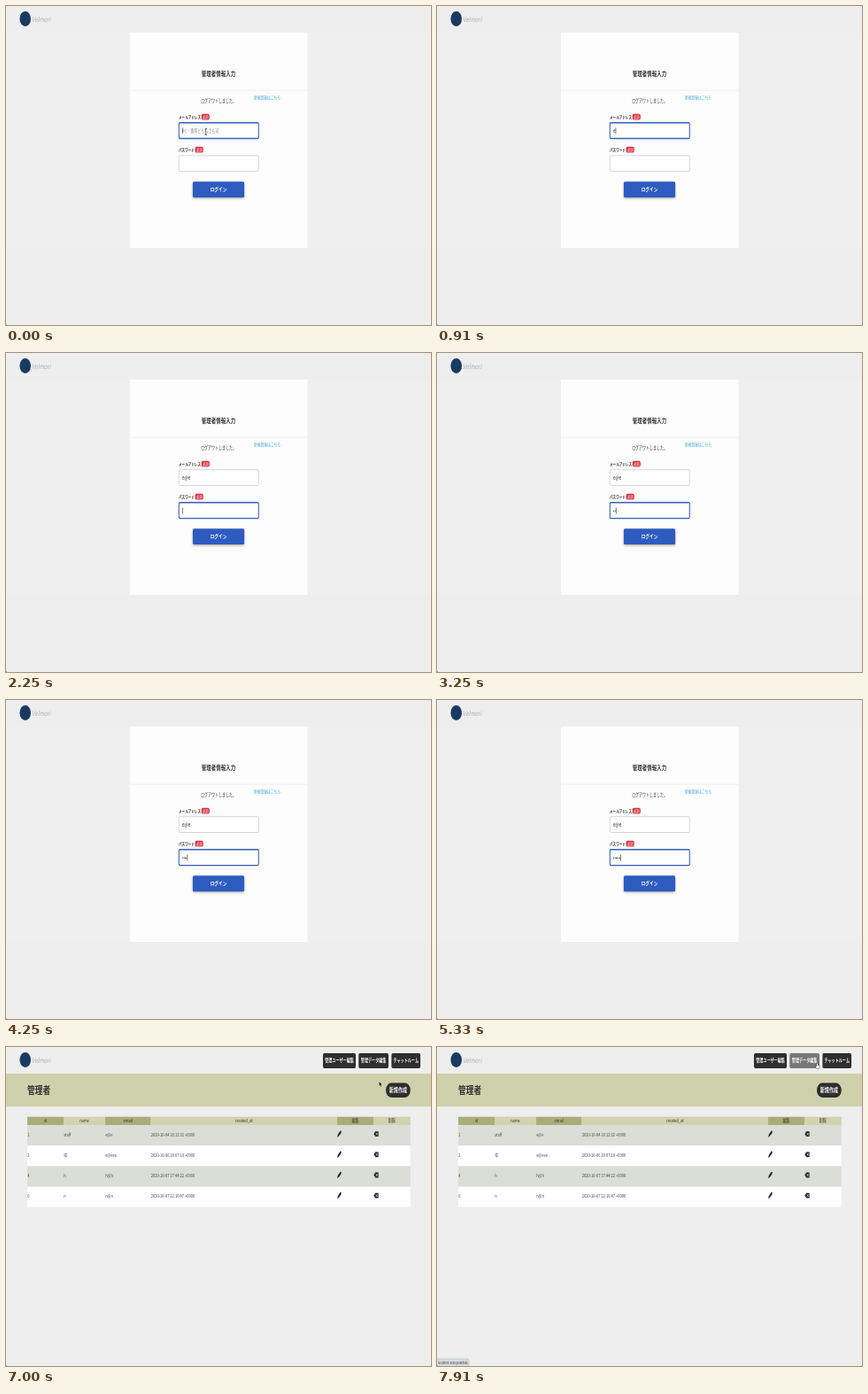
Animation, 480 px wide and 360 px high, one loop 8 s. Source, as an HTML page with a canvas:

```html
<!DOCTYPE html>
<html lang="ja">
<head>
<meta charset="utf-8">
<title>管理者情報入力</title>
<style>
  html, body { margin: 0; height: 100%; overflow: hidden; background: #eee; }
  canvas { display: block; width: 100vw; height: 100vh; }
</style>
</head>
<body>
<canvas></canvas>
<script>
const LOOP = 8000, STEP = 1000 / 12;
const DARK = '#2e2e2e', BLUE = '#2d5bc0';
const canvas = document.querySelector('canvas');
const ctx = canvas.getContext('2d');

// The screen is 640 x 360 and is squeezed to the 4:3 stage.
function fitStage() {
  const ratio = window.devicePixelRatio || 1;
  canvas.width = innerWidth * ratio;
  canvas.height = innerHeight * ratio;
}

function box(x, y, w, h, fill, radius = 0, stroke, lineWidth = 0.7) {
  ctx.beginPath();
  ctx.roundRect(x, y, w, h, radius);
  ctx.fillStyle = fill;
  ctx.fill();
  if (!stroke) return;
  ctx.strokeStyle = stroke;
  ctx.lineWidth = lineWidth;
  ctx.stroke();
}

function shadowBox(x, y, w, h, fill, radius) {
  ctx.save();
  ctx.shadowColor = 'rgba(0,0,0,.4)';
  ctx.shadowBlur = 3;
  ctx.shadowOffsetY = 1.2;
  box(x, y, w, h, fill, radius);
  ctx.restore();
}

function label(text, x, y, size, { color = '#333', weight = 400, align = 'left', style = 'normal' } = {}) {
  ctx.font = `${style} ${weight} ${size}px "Noto Sans CJK JP", "Noto Sans", sans-serif`;
  ctx.fillStyle = color;
  ctx.textAlign = align;
  ctx.fillText(text, x, y);
  return ctx.measureText(text).width;
}

function shape(x, y, points, fill, stroke) {
  ctx.beginPath();
  points.forEach(([px, py]) => ctx.lineTo(x + px, y + py));
  ctx.closePath();
  if (stroke) {
    ctx.strokeStyle = stroke;
    ctx.lineWidth = 0.9;
    ctx.stroke();
  }
  ctx.fillStyle = fill;
  ctx.fill();
}

function brand() {
  ctx.beginPath();
  ctx.arc(29, 14.5, 8.4, 0, 7);
  ctx.fillStyle = '#1b3a63';
  ctx.fill();
  label('Velmori', 39, 18, 7.8, { color: '#aab0bb', style: 'italic' });
}

function requiredBadge(x, y) {
  box(x, y, 12.2, 6.8, '#d9303f', 2.2);
  label('必須', x + 6.1, y + 5, 4.4, { color: '#fff', align: 'center', weight: 500 });
}

function field(y, { text, size, focused, placeholder, caret }) {
  box(260.4, y, 120, 17.8, '#fefefe', 1.5, focused ? '#3560b5' : '#c8c8c8', focused ? 1.4 : 0.8);
  const baseline = y + 11.4;
  const width = label(text, 265.4, baseline, size, { color: '#222', weight: 500 });
  if (placeholder && !text) label(placeholder, 265.4, y + 10.9, 5.4, { color: '#8a8a8a' });
  if (focused && caret) box(265.6 + width, y + 5.6, 0.8, 7, '#222');
}

function statusBar(width, text) {
  box(-2, 352, width + 2, 10, '#d9dddf', [0, 2, 0, 0], '#b4b8ba');
  label(text, 1.3, 357.6, 3.95, { color: '#333', weight: 500 });
}

const typedCount = (t, times) => times.filter(at => t >= at).length;

function loginPage(t) {
  box(0, 30, 640, 243, '#efefef');
  box(186.7, 30, 267.3, 243, '#fdfdfd');
  box(186.7, 94.7, 267.3, 0.7, '#ebebeb');
  label('管理者情報入力', 320, 78.7, 7.3, { weight: 700, align: 'center' });
  label('ログアウトしました。', 293.5, 109, 5.3);
  label('新規登録はこちら', 373.4, 104.7, 5, { color: '#39a5e6' });

  label('メールアドレス', 260, 126.8, 4.75, { weight: 700 });
  requiredBadge(294.3, 121.7);
  field(131.7, {
    text: 'e@e'.slice(0, typedCount(t, [790, 1200, 1550])), size: 5.9,
    placeholder: 'PC・携帯どちらでも可', focused: t < 1990, caret: true
  });

  label('パスワード', 260, 163.8, 4.75, { weight: 700 });
  requiredBadge(284.8, 158.8);
  field(168.8, {
    text: '•'.repeat(typedCount(t, [2700, 3200, 3700, 4150, 4650, 5100])), size: 5.3,
    focused: t >= 1990 && t < 5990, caret: true
  });

  const hovered = t >= 5740;
  shadowBox(281.3, 198.3, 77.4, 17.6, hovered ? '#6486cf' : BLUE, 1.5);
  label('ログイン', 320, 209.3, 6.2, { color: '#fff', weight: 700, align: 'center' });
  if (t >= 6070) statusBar(213, 'localhost を待機しています...');
}

const columns = [
  ['id', 32, 54.7], ['name', 86.7, 62.6], ['email', 149.3, 68.7],
  ['created_at', 218, 280.7], ['編集', 498.7, 54.6], ['削除', 553.3, 55.7]
];
const rows = [
  ['1', 'staff', 'e@e', '2020-10-04 18:12:32 +0900'],
  ['2', 'ゆ', 'e@eee', '2020-10-06 18:07:10 +0900'],
  ['4', 'h', 'h@h', '2020-10-07 17:44:22 +0900'],
  ['6', 'n', 'n@n', '2020-10-07 22:10:47 +0900']
];
const navButtons = [['管理ユーザー編集', 477.3, 49.4], ['管理データ編集', 531, 45], ['チャットルーム', 580.5, 43.5]];

function pencilIcon(x, y) {
  shape(x, y, [[0, 3.8], [0.8, 0.6], [4.6, -3.8], [6.3, -3.2], [5.4, -0.8], [2.2, 2.4]], '#222');
}

function deleteIcon(x, y) {
  shape(x, y, [[0, 0], [2.4, -2.9], [7, -2.9], [7, 2.9], [2.4, 2.9]], '#222');
  ctx.beginPath();
  ctx.moveTo(3.2 + x, y - 1.3); ctx.lineTo(x + 5.6, y + 1.3);
  ctx.moveTo(5.6 + x, y - 1.3); ctx.lineTo(x + 3.2, y + 1.3);
  ctx.strokeStyle = '#eee';
  ctx.lineWidth = 0.8;
  ctx.stroke();
}

function listPage(t) {
  const hovered = t >= 7490;
  navButtons.forEach(([text, x, w], i) => {
    box(x, 7, w, 17, hovered && i === 1 ? '#777' : DARK, 2);
    label(text, x + w / 2, 17.4, 5.45, { color: '#fff', weight: 700, align: 'center' });
  });

  box(0, 30, 640, 37.3, '#ced1ab');
  label('管理者', 32, 53.2, 11.6, { weight: 700 });
  box(572, 40.5, 37, 16.5, DARK, 8.2);
  label('新規作成', 590.5, 51.3, 6.7, { color: '#fff', weight: 700, align: 'center' });

  columns.forEach(([text, x, w], i) => {
    box(x, 78.7, w, 9.5, i % 2 ? '#d0d3ae' : '#aaad7a');
    label(text, x + w / 2, 85.4, 5.4, { weight: 500, align: 'center' });
  });
  rows.forEach((cells, i) => {
    const y = 88.2 + i * 23.15;
    box(32, y, 577, 23.15, i % 2 ? '#fefefe' : '#dbddd7');
    cells.forEach((text, j) => label(text, columns[j][1] + 0.2, y + 12.8, 5.4, { color: '#4a4a4a' }));
    pencilIcon(498.9, y + 10);
    deleteIcon(553.8, y + 10);
  });
  if (hovered) statusBar(48, 'localhost:3000/postdata');
}

const pointerPath = [[5350, 301, 142], [5990, 356.5, 204], [6500, 356.5, 204], [6990, 562, 39], [7160, 562, 39], [7580, 572, 20]];

function pointerAt(t) {
  const next = pointerPath.findIndex(([at]) => at > t);
  if (next < 0) return pointerPath.at(-1).slice(1);
  if (next === 0) return pointerPath[0].slice(1);
  const [t0, x0, y0] = pointerPath[next - 1], [t1, x1, y1] = pointerPath[next];
  const p = (t - t0) / (t1 - t0), eased = p * p * (3 - 2 * p);
  return [x0 + (x1 - x0) * eased, y0 + (y1 - y0) * eased];
}

function pointer(t) {
  if (t >= 790 && t < 5350) return;
  const [x, y] = pointerAt(t);
  if (t < 5500) {
    box(x - 0.4, y - 3.4, 0.8, 6.8, '#222');
    box(x - 1.5, y - 3.6, 3, 0.7, '#222');
    box(x - 1.5, y + 2.9, 3, 0.7, '#222');
  } else if ((t >= 5740 && t < 6500) || t >= 7490) {
    shape(x, y, [[0, -1.6], [1.2, -1.6], [1.4, 0.6], [3.8, 1.2], [3.6, 3.4], [2.8, 4.6], [0, 4.6], [-1.8, 2], [-1, 1.4], [0, 2]], '#fff', '#222');
  } else {
    shape(x, y, [[0, 0], [0, 5], [1.3, 4], [2.2, 6], [3.2, 5.5], [2.3, 3.7], [4, 3.6]], '#111', '#fff');
  }
}

function draw(now) {
  const t = Math.floor(((now % LOOP) + 7) / STEP) * STEP;
  ctx.setTransform(canvas.width / 640, 0, 0, canvas.height / 360, 0, 0);
  box(0, 0, 640, 360, '#eee');
  brand();
  (t < 6490 ? loginPage : listPage)(t);
  shape(0, 360, [[0, -1.2], [1.4, 0], [0, 0]], '#666');
  pointer(t);
}

let start;
function frame(now) {
  start ??= now;
  draw(now - start);
  requestAnimationFrame(frame);
}

addEventListener('resize', fitStage);
fitStage();
requestAnimationFrame(frame);
</script>
</body>
</html>
```
